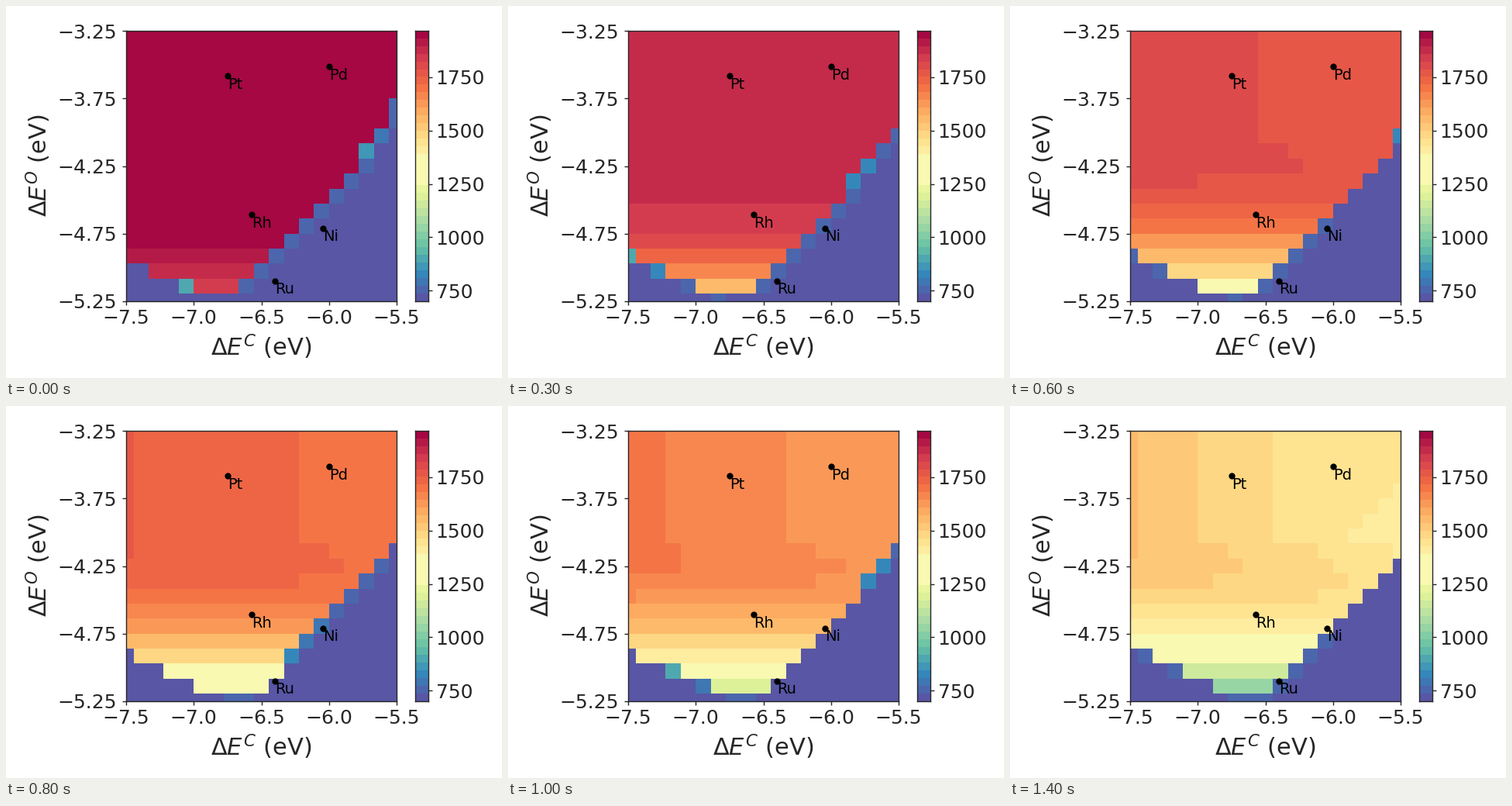
A matplotlib script for the animation above (1.5 s loop, 640x480 px).

```python
import numpy as np
import matplotlib.pyplot as plt
from matplotlib.animation import FuncAnimation
from matplotlib.colors import BoundaryNorm, ListedColormap

W, H, DPI = 640, 480, 100
FRAMES, INTERVAL = 15, 100
N = 19
T_MIN, T_MAX = 700, 1967
INK = "#262626"

plt.rcParams.update({
    "font.family": "DejaVu Sans", "text.color": INK, "axes.edgecolor": INK,
    "xtick.color": INK, "ytick.color": INK, "axes.linewidth": 1.0,
    "xtick.major.width": 1.0, "ytick.major.width": 1.0,
    "xtick.labelsize": 18, "ytick.labelsize": 18,
})

# Even colour bands, with one wide pale band between the two halves
EDGES = np.concatenate([np.linspace(0, 0.43, 16), np.linspace(0.546, 1, 17)])

row, col = np.mgrid[0:N, 0:N]
DEPTH = np.clip((row - 8) / 9, 0, None)
SLOPE = np.clip(1 - 0.2 * (row - 7), 0, 1) * (
    np.minimum(col, 13) + np.maximum(0, col + row - 20))


def field(i):
    """Share of the temperature range on the grid at step i."""
    s = i / (FRAMES - 1)
    plateau = 0.986 - 0.26 * s - 0.065 * s**4
    tilt = 0.0002 + 0.0058 * s**1.6
    drop = 0.39 - 0.3 * (1 - s) ** 3
    power = 2.1 + 4 * (1 - s) ** 6
    u = plateau - tilt * SLOPE - drop * DEPTH**power

    # Cold region below the diagonal front
    front = 25.5 + 2.32 * s**0.69
    glow = 0.02 + 0.03 * (1 - s) ** 3
    for r in range(5, N - 1):
        reach = front - 0.05 * (17 - r) - 0.08 * max(0, 9 - r) ** 2
        edge = int(reach) - r
        if edge < N:
            u[r, edge:] = 0
            u[r, edge] = glow + 0.1 * (reach % 1) ** 6

    # Cold region in the lower left corner
    for r in range(15, N - 1):
        reach = 0.631 + 1.74 * s + 2.185 * (r - 15)
        edge = int(reach)
        u[r, :edge] = 0
        if edge:
            u[r, edge - 1] = 0.02 + 0.15 * (1 - reach % 1) ** 3

    warm = abs(np.arange(N) - 6 - 2 * s) < 1.2 * s**0.5
    u[-1] = np.where(warm, 0.04, 0)
    return np.clip(u, 0, 0.9999)


def band_colors():
    cmap = plt.get_cmap("Spectral_r")
    return [cmap(np.linspace(a, b, 30)).mean(axis=0)
            for a, b in zip(EDGES, EDGES[1:])]


def add_axes(x0, y0, x1, y1):
    return fig.add_axes([x0 / W, 1 - y1 / H, (x1 - x0) / W, (y1 - y0) / H])


fig = plt.figure(figsize=(W / DPI, H / DPI), dpi=DPI, facecolor="white")
bands = ListedColormap(band_colors())
norm = BoundaryNorm(EDGES, bands.N)
style = dict(cmap=bands, norm=norm, interpolation="nearest", aspect="auto")

ax = add_axes(155, 32, 504, 381)
half = 1 / (N - 1)
heat = ax.imshow(field(0), extent=(-7.5 - half, -5.5 + half,
                                   -5.25 - half, -3.25 + half), **style)
ax.set(xlim=(-7.5, -5.5), ylim=(-5.25, -3.25),
       xticks=np.arange(-7.5, -5.4, 0.5), yticks=np.arange(-5.25, -3.2, 0.5))
ax.tick_params(axis="y", pad=5)

cax = add_axes(528, 32, 545, 381)
ramp = np.linspace(0, 0.9999, 700)[:, None]
cax.imshow(ramp, origin="lower", extent=(0, 1, T_MIN, T_MAX), **style)
cax.yaxis.tick_right()
cax.set(xticks=[], yticks=range(750, 1751, 250))

centered = dict(ha="center", va="center", fontsize=22)
fig.text(329 / W, 1 - 440 / H, r"$\Delta E^{C}$ (eV)", **centered)
fig.text(41.5 / W, 1 - 205.5 / H, r"$\Delta E^{O}$ (eV)", rotation=90, **centered)

METALS = {"Pt": (-6.75, -3.585), "Pd": (-6.0, -3.515), "Rh": (-6.57, -4.61),
          "Ru": (-6.4, -5.1), "Ni": (-6.045, -4.71)}
for name, spot in METALS.items():
    ax.plot(*spot, "o", color="black", markersize=6, markeredgewidth=0)
    ax.annotate(name, spot, xytext=(0, -12), textcoords="offset points",
                fontsize=14, color="black", va="baseline")


def update(i):
    heat.set_data(field(i))
    return [heat]


anim = FuncAnimation(fig, update, frames=FRAMES, interval=INTERVAL,
                     repeat=True, repeat_delay=0, blit=False)
plt.show()
```
